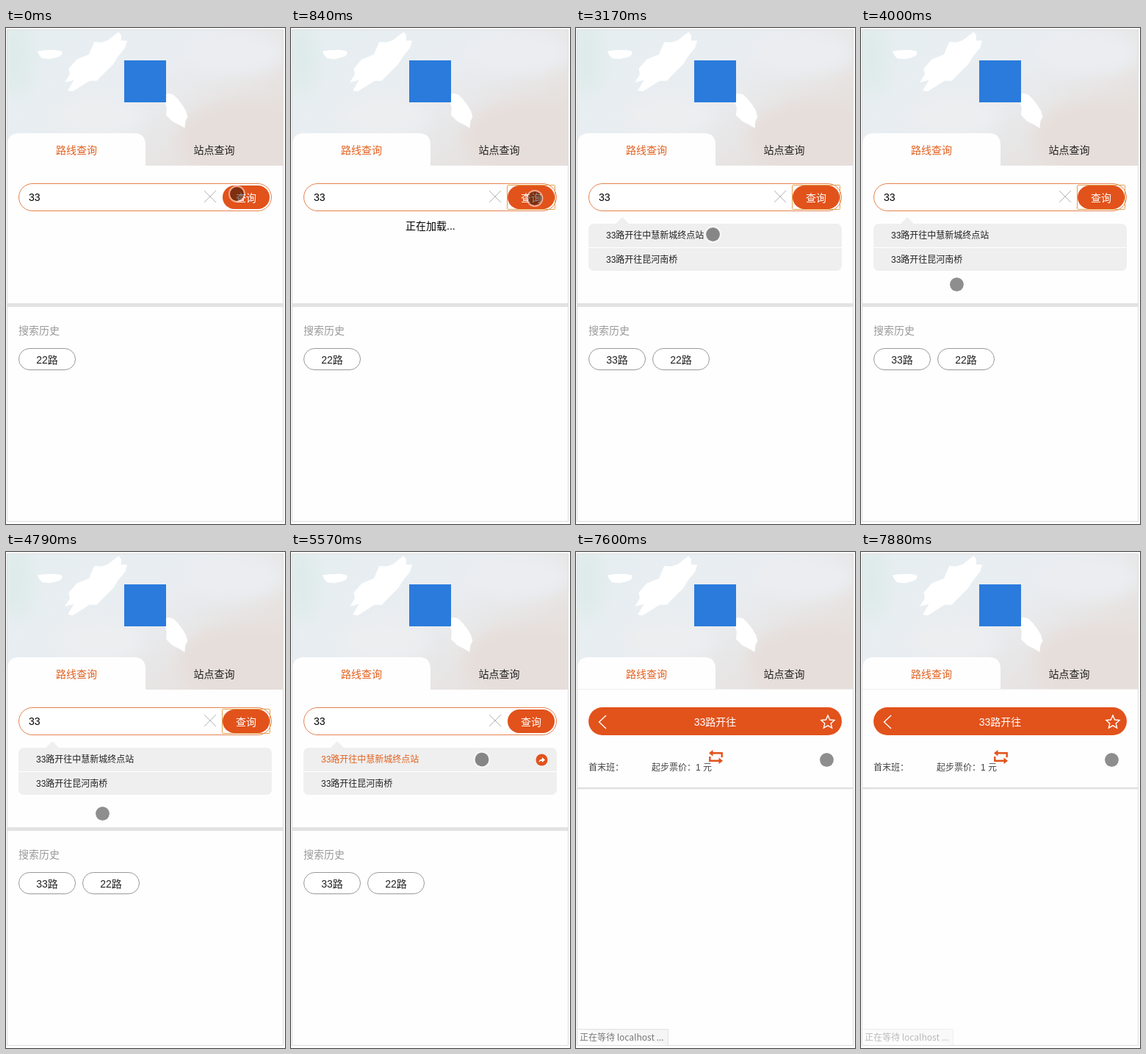
Recreate the animation shown at these times as an HTML page. Size 380 px wide and 674 px high, loop 8000 ms.

```html
<!DOCTYPE html>
<html lang="zh-CN">
<head>
<meta charset="utf-8">
<title>路线查询</title>
<style>
html, body { margin: 0; width: 100%; height: 100%; overflow: hidden; background: #fff; }
svg { display: block; }
text { font: 14px "Liberation Sans", "Noto Sans CJK SC", "Noto Sans CJK", sans-serif; fill: #222; }
.small { font-size: 12px; }
.mid { text-anchor: middle; }
.pill { fill: #fff; stroke: #999; }
.line { fill: none; stroke: #fff; stroke-width: 1.4; }
</style>
</head>
<body>
<svg width="380" height="674" viewBox="0 0 380 674">
  <defs>
    <linearGradient id="sky" x2="1" y2=".6">
      <stop offset="0" stop-color="#e6eef1"/>
      <stop offset=".55" stop-color="#e9edf1"/>
      <stop offset="1" stop-color="#e6dfdb"/>
    </linearGradient>
    <filter id="soft"><feGaussianBlur stdDeviation="10"/></filter>
    <clipPath id="head"><path d="M2 3H377V187H2Z"/></clipPath>
  </defs>

  <rect x="1.5" y="2.5" width="376" height="668" fill="#fefefe" stroke="#ddd"/>
  <g clip-path="url(#head)">
    <path fill="url(#sky)" d="M2 3H377V187H2Z"/>
    <g filter="url(#soft)">
      <ellipse cx="15" cy="40" rx="22" ry="50" fill="#dfebea"/>
      <ellipse cx="125" cy="120" rx="60" ry="30" fill="#eceef0"/>
      <ellipse cx="320" cy="150" rx="85" ry="50" fill="#e6deda"/>
      <ellipse cx="310" cy="35" rx="70" ry="30" fill="#ebedf1"/>
    </g>
    <path id="clouds" fill="#fff"/>
  </g>
  <rect x="161" y="44" width="57" height="57" fill="#2a7bdc"/>
  <path fill="#fefefe" d="M2 187V159Q2 143 18 143H174Q190 143 190 159V187Z"/>
  <text class="mid" x="96" y="171" style="fill:#e2611f">路线查询</text>
  <text class="mid" x="283.5" y="171">站点查询</text>

  <g id="search">
    <rect x="17.5" y="211.5" width="344" height="37" rx="18.5" fill="#fff" stroke="#e58350"/>
    <text x="31" y="235" style="fill:#000">33</text>
    <path d="M270 221L286 237M286 221L270 237" stroke="#b5b5b5"/>
    <rect x="295" y="214" width="64" height="32" rx="16" fill="#e2521b"/>
    <text class="mid" x="327" y="236" style="fill:#fff">查询</text>
    <rect id="focus" x="294.5" y="213.5" width="65" height="33" rx="1" fill="none" stroke="#e3a04c"/>
    <text id="loading" x="156" y="274" style="fill:#000">正在加载...</text>

    <g id="list">
      <path fill="#efefef" d="M53 267L63 257L73 267Z"/>
      <rect x="17" y="266" width="345" height="64" rx="7" fill="#efefef"/>
      <path d="M17 298.5H362" stroke="#fff"/>
      <text id="route" class="small" x="41" y="286">33路开往中慧新城终点站</text>
      <text class="small" x="41" y="318.5">33路开往昆河南桥</text>
      <g id="go">
        <circle cx="341.5" cy="282.5" r="8" fill="#e2521b"/>
        <path d="M337.5 286Q338 281.5 342 281.5V279L346 282.5L342 286V283.8Q339 283.8 337.5 286Z" fill="#fff"/>
      </g>
    </g>

    <path fill="#e2e2e2" d="M2 374H377V379H2Z"/>
    <text x="17" y="416" style="fill:#999">搜索历史</text>
    <rect class="pill" x="17.5" y="435.5" width="77" height="29" rx="14.5"/>
    <text id="recent" class="mid" x="56" y="456">22路</text>
    <g id="older">
      <rect class="pill" x="104.5" y="435.5" width="77" height="29" rx="14.5"/>
      <text class="mid" x="143" y="456">22路</text>
    </g>
  </g>

  <g id="result">
    <path d="M2 186.5H377" stroke="#eee"/>
    <path d="M2 320.5H377" stroke="#d8d8d8"/>
    <path d="M2 321.5H377" stroke="#e6e6e6"/>
    <path d="M2 322.5H377" stroke="#f4f4f4"/>
    <rect x="17" y="211" width="345" height="38" rx="19" fill="#e2521b"/>
    <path class="line" d="M41 222L31.5 231L41 240"/>
    <path id="star" class="line"/>
    <text class="mid" x="189.5" y="236" style="fill:#fff">33路开往</text>
    <text class="small" x="17" y="297" style="fill:#444">首末班：</text>
    <text class="small" x="103" y="297" style="fill:#444">起步票价：1 元</text>
    <path d="M185 273.2H198.7V279M196 283.8H182.3V278" fill="none" stroke="#e2521b" stroke-width="2.4"/>
    <path d="M181 273.2L186.5 269V277.4ZM200 283.8L194.5 279.6V288Z" fill="#e2521b"/>
    <g id="status">
      <path d="M2 648.5H125.5V670" fill="#f5f5f5" stroke="#e2e2e2"/>
      <text class="small" x="5" y="664" style="fill:#777;font-family:'Noto Sans CJK SC','Noto Sans CJK',sans-serif">正在等待 localhost ...</text>
    </g>
  </g>

  <g id="cursor">
    <circle r="9.5" fill="#000" fill-opacity=".44"/>
    <circle r="10.5" fill="none" stroke="#fff" stroke-opacity=".5" stroke-width="2"/>
  </g>
</svg>
<script>
const LOOP = 8000, TICK = 135;
const $ = id => document.getElementById(id);

// pointer moves: start, end, x, y
const home = [314.5, 225.5];
const moves = [
  [0, 405, 332, 231.5],
  [810, 1620, 225.5, 248.5],
  [1620, 1890, 223.5, 252.5],
  [2700, 3105, 186.5, 280.5],
  [3720, 4185, 39, 459.5],
  [4590, 4725, 131.5, 355.5],
  [4725, 4860, 158.5, 285.5],
  [4860, 5130, 168, 277],
  [5130, 5940, 352, 287],
  [5940, 6210, 341.5, 282.5]
];

const ease = u => u * u * (3 - 2 * u);

// the pointer is sampled at regular ticks
function pointer(t) {
  t -= t % TICK;
  let [x, y] = home;
  for (const [start, end, toX, toY] of moves) {
    const u = ease(Math.min(1, Math.max(0, (t - start) / (end - start))));
    x += (toX - x) * u;
    y += (toY - y) * u;
  }
  return [x, y];
}

// closed outline of n points; radius(i) scales the ellipse rx, ry turned by tilt
function outline(cx, cy, rx, ry, tilt, n, radius) {
  const points = Array.from({ length: n }, (_, i) => {
    const a = i * 2 * Math.PI / n - Math.PI / 2, r = radius(i);
    const u = rx * r * Math.cos(a), v = ry * r * Math.sin(a);
    return [
      cx + u * Math.cos(tilt) - v * Math.sin(tilt),
      cy + u * Math.sin(tilt) + v * Math.cos(tilt)
    ].map(c => c.toFixed(1));
  });
  return "M" + points.join("L") + "Z";
}

let seed = 7;
const random = () => (seed = seed * 16807 % 2147483647) / 2147483647;
const rough = () => .75 + .5 * random();

$("star").setAttribute("d", outline(343, 231.5, 9.5, 9.5, 0, 10, i => i % 2 ? .46 : 1));
$("clouds").setAttribute("d",
  outline(122, 46, 50, 18, -.75, 22, rough) +
  outline(59, 35, 16, 6, 0, 12, rough) +
  outline(231, 110, 24, 13, 1, 14, rough));

const show = (id, on) => $(id).style.display = on ? "" : "none";

function draw(t) {
  const found = t >= 2440, chosen = t >= 5450, done = t >= 7600;
  show("search", !done);
  show("result", done);
  show("focus", t >= 570 && !chosen);
  show("loading", t >= 570 && !found);
  show("list", found);
  show("older", found);
  show("go", chosen);
  $("recent").textContent = found ? "33路" : "22路";
  $("route").style.fill = chosen ? "#e2611f" : "";
  $("status").style.opacity = t < 7880 ? 1 : .5;
  $("cursor").setAttribute("transform", `translate(${pointer(t)})`);
}

const start = performance.now();
function tick() {
  draw((performance.now() - start) % LOOP);
  requestAnimationFrame(tick);
}
tick();
</script>
</body>
</html>
```
